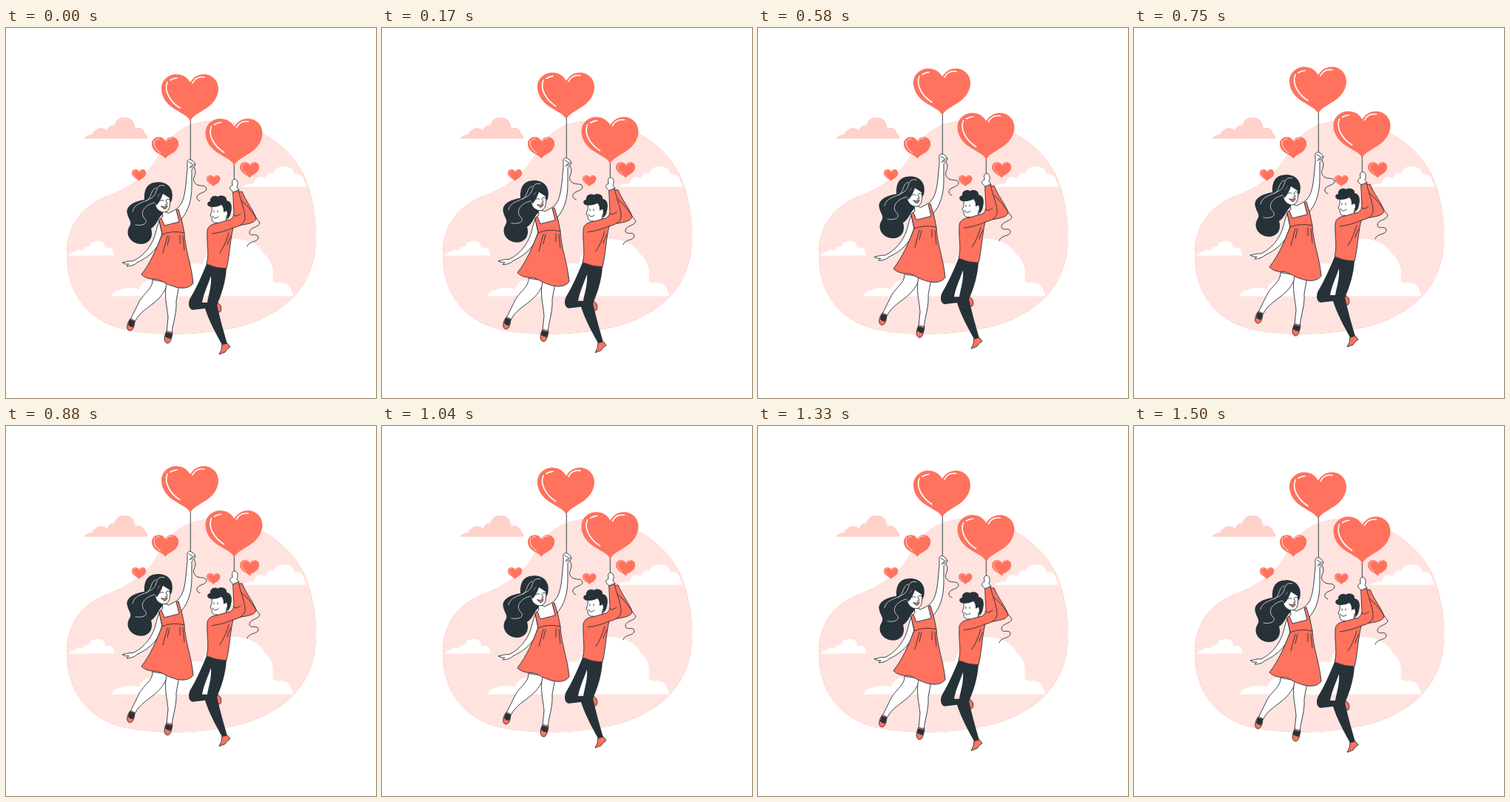
Animation of 500x500 px, one loop 1540 ms. Source, as an HTML page:

```html
<!DOCTYPE html>
<html lang="en">
<head>
<meta charset="utf-8">
<title>Couple floating on heart balloons</title>
<style>
  html, body { margin: 0; width: 100%; height: 100%; overflow: hidden; background: #fff; }
  svg { display: block; width: 100vw; height: 100vh; }
  .red { fill: #ff725e; }
  .dark { fill: #263238; }
  .white { fill: #fff; }
  .line { fill: none; }
  .ink { stroke: #263238; stroke-width: .9; stroke-linecap: round; stroke-linejoin: round; }
  .shine { fill: none; stroke: #fff; stroke-width: .7; stroke-linecap: round; }
</style>
</head>
<body>
<svg viewBox="0 0 500 500">
  <defs>
    <g id="heart">
      <path class="red" d="M39 63.500C35 56 26 53 17 47C6 40 0 30 0 20C0-1 29-7 39 11.500C49-7 77-1 77 20C77 30 71 40 60 47C51 53 43 56 39 63.500Z"/>
      <path class="shine" style="stroke-width:1.7" d="M8 11C3 23 12 38 25 46M12 8.500Q16 6 21 5.500M42 12.500C45 6 51 3.500 58 4.500"/>
    </g>
    <path id="blob" d="M273 126C331 123 384 156 405 204C415 230 422 268 418 300C412 352 375 385 325 401C280 414 210 418 160 407.500C105 395 81 350 82 305C82 272 98 245 130 230C168 216 192 200 209 168C222 144 244 128 273 126Z"/>
    <path id="cloud" d="M106 149.200Q109 145 117 144C119 136 130 132 137 139C138 133 143 131 147 132C148 124 154 121 160 121C168 121 174 126 174.500 136C181 133 187 137 188 143Q191 145 191 149.200Z"/>
  </defs>

  <use href="#blob" class="red"/>
  <use href="#blob" class="white" opacity=".8"/>
  <use href="#cloud" class="red"/>
  <use href="#cloud" class="white" opacity=".68"/>
  <g class="white">
    <path d="M319 214.700Q324 210 335 210C336 202 344 199 350 203C351 196 357 194 361 197C363 190 369 187 375 187C383 187 389 191 390 198C398 196 403 202 403 208Q406 210 406 214.700Z"/>
    <path d="M84 307.500Q87 303 93 303C95 299 101 299 104 302C104 297 108 295 112 296C113 290 118 288 124 288C130 288 134 291 134 297C141 295 145 299 145 303Q147 304 147 307.500Z"/>
    <path d="M142 362.500Q145 355 154 354C160 350 173 351 180 353C182 344 191 339 201 340C208 331 224 330 239 334C244 320 254 316 266 319C270 299 287 285 306 285C332 284 347 299 348 305C359 312 363 328 360 341C366 346 368 344 371 344C380 344 385 349 385 355Q388 357 388 362.500Z"/>
  </g>
  <use href="#heart" transform="translate(197 147) scale(.47)"/>
  <use href="#heart" transform="translate(170 191) scale(.25)"/>
  <use href="#heart" transform="translate(271 199) scale(.24)"/>
  <use href="#heart" transform="translate(316 181) scale(.34)"/>

  <g id="couple">
    <g class="line ink">
      <path d="M249.300 124V184M308.300 184V210"/>
      <path d="M252 186C263 198 247 203 257 211C262 215 270 211 271 217C271 223 260 222 258 228Q257 232 262 234"/>
    </g>
    <use href="#heart" x="210" y="62"/>
    <use href="#heart" x="269.500" y="122"/>

    <g id="woman">
      <path class="dark" d="M224 233C228 217 218 207 203 208.500C192 209 186 217 187 232C173 234 161 241 164 251C165 258 171 262 167 268C160 279 169 292 183 292C196 291 199 280 196 271C204 266 205 258 211 252Z"/>
      <path class="shine" d="M214 213C200 210 207 224 196 230C184 237 173 237 171 248M203 216C195 218 198 228 190 234M201 236C188 239 181 248 186 256C195 264 184 268 175 266"/>
      <g class="white ink">
        <path d="M198 341C199 353 183 360 178 374L168 394L174 397C181 383 192 379 205 367C214 358 216 352 219 344Z"/>
        <path d="M217 345C213 362 218 377 219 391L217 411L224 413C226 396 231 385 230 369L234 347Z"/>
        <path d="M209 258C203 265 204 279 196 292C189 304 179 312 171 315C165 314 161 317 157 317Q161 320 166 319L163 322Q172 322 177 317C190 311 201 302 206 292L214 270Z"/>
        <path d="M211 247L212 255Q209 257 207 260L211 279L239 275L237 258C246 248 251 233 251 213L251 191C253 189 255 188 256 184Q254 180 250 178C246 177 244 180 245 184L245 191C243 209 243 225 237 237Q233 244 228 246L220 250Z"/>
        <path d="M247 181L252 184M249 187L255 184M248 189L253 187" class="line"/>
        <path d="M208 223C203 229 201 235 202 240C204 246 209 249 214 249C221 248 223 240 221 226Q215 226 211 221Z"/>
      </g>
      <path class="dark" d="M218 214C209 214 210 226 201 232L203 240C207 236 210 230 212 224Q217 227 224 232Z"/>
      <path class="line ink" d="M208 234Q211 231 213 234M217 232Q219 230 221 232M216 233L218 238L215 239"/>
      <path class="red ink" d="M210 241Q214 243 218 240Q217 245 214 244.500Z"/>
      <path class="red ink" d="M207 259L210 257L214 267L234 262L230 246L233 245L238 262L241 277C242 300 251 321 253 345C246 354 233 352 223 348C214 345 207 339 202 339.500C194 340 187 337 183 333C196 316 202 301 211 279Z"/>
      <path class="line ink" d="M211 279Q225 273 241 277M218 281L212 304M221 281L218 294M235 280L235 291M239 281L241 300"/>
      <path class="red ink" d="M168 393C163 399 162 408 167 409C171 410 174 403 174 396Z"/>
      <path class="dark" d="M167 394L174 396L172 404Q168 405 165 401Z"/>
      <path class="red ink" d="M217 410C213 417 213 425 218 426C222 427 224 419 225 412Z"/>
      <path class="dark" d="M216 411L225 413L223 420Q219 420 215 417Z"/>
    </g>

    <g id="man">
      <path class="red ink" d="M311 222L319 221C324 234 335 247 338 257C337 264 325 265 314 267Z"/>
      <path class="line ink" d="M314 231C328 238 336 255 343 263C342 270 328 269 329 277C331 283 340 276 341 283C341 290 328 287 326 295"/>
      <path class="red ink" d="M286 371L290 375Q292 382 289 384Q285 385 284 380Z"/>
      <path class="dark" fill-rule="evenodd" d="M271 319L298 324C297 343 291 361 285 374C289 392 294 410 299 427L292 428C283 412 274 395 269 379L252 381C246 379 246 371 249 365C258 350 264 336 271 319ZM277 335C273 347 267 359 265 371L272 371C274 359 278 349 277 335Z"/>
      <path class="red ink" d="M292 428L299 426L303 431Q298 434 296 438L288 441Q292 435 292 428Z"/>
      <path class="white ink" d="M278 238C278 246 279 247 276 253L278 256C278 262 281 264 286 263L287 268L297 264L298 254C303 251 300 245 297 247L293 238Z"/>
      <path class="dark" d="M279 242C271 242 270 235 276 234C275 228 283 225 286 228C291 225 299 227 298 233C305 234 306 242 304 249Q303 256 298 259Q300 252 298 247L294 249C294 245 294 242 291 239Q286 242 279 242Z"/>
      <path class="line ink" d="M279 254Q282 260 287 255M281 247V249M286 247V249"/>
      <path class="white ink" d="M307 222L303 218C302 215 304 213 306 213L305.500 208C306 204 310 203 312 206C314 209 313 213 312 215L315 219Z"/>
      <path class="red ink" d="M307 222L314 219C317 233 324 249 323 258C322 264 316 268 307 270C303 285 302 310 298 325Q284 325 271 319C275 306 271 291 272 277C271 269 277 265 285 264L299 260Q306 260 308 252Z"/>
      <path class="line ink" d="M307 252Q310 257 317 251M278 278Q294 276 307 270M301 277Q296 294 289 304M304 281Q300 288 299 293"/>
    </g>
  </g>
</svg>
<script>
  const LOOP = 1540, FLOAT = 1500, RISE = 10;
  const couple = document.getElementById("couple");

  // Linear rise and fall, then a short rest before the loop restarts.
  function draw(now) {
    const phase = Math.min((now % LOOP) / FLOAT, 1);
    const lift = RISE * (1 - Math.abs(2 * phase - 1));
    couple.setAttribute("transform", `translate(0 ${-lift})`);
    requestAnimationFrame(draw);
  }
  requestAnimationFrame(draw);
</script>
</body>
</html>
```
